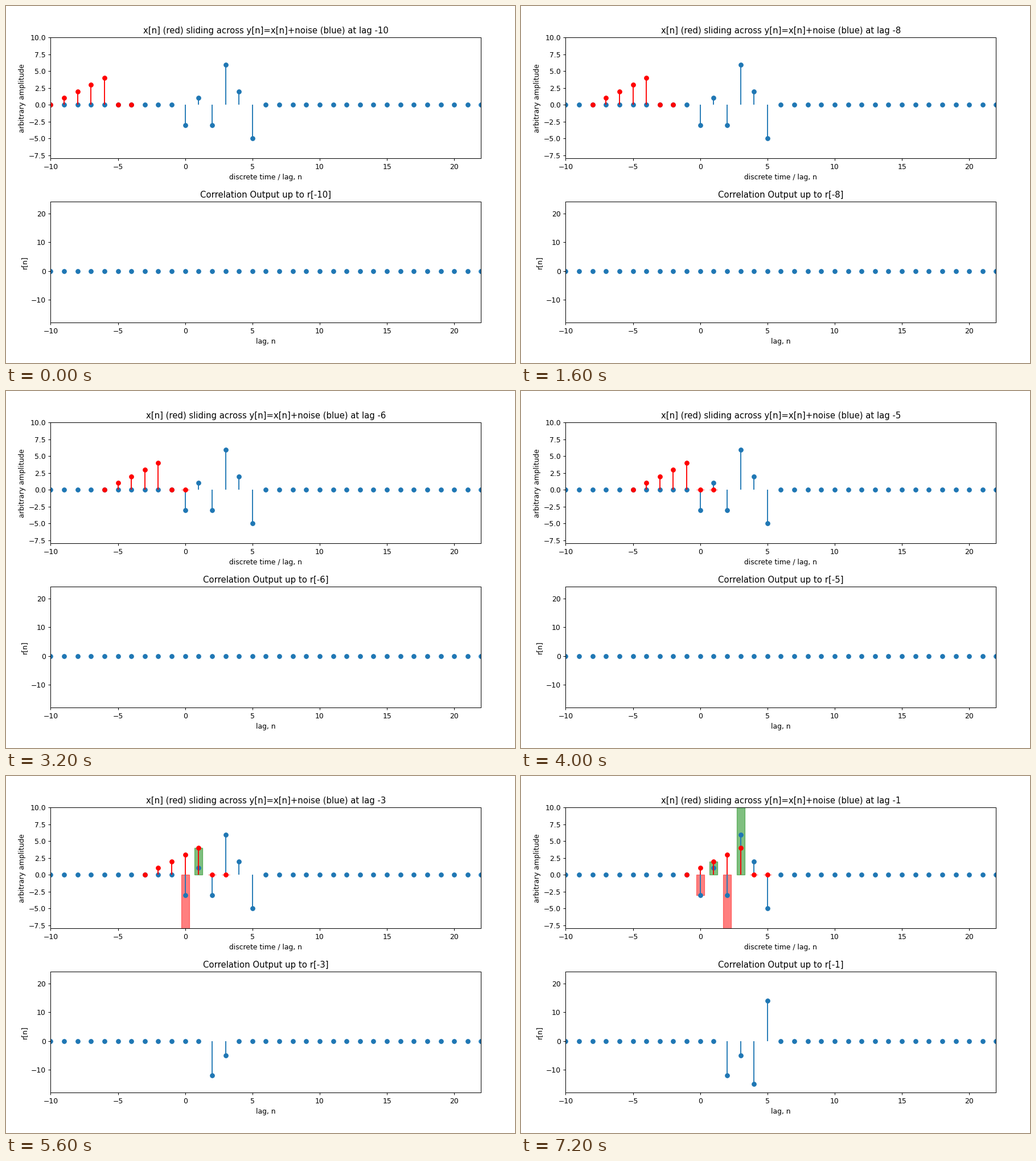
A matplotlib script for the animation above (8 s loop, 894 by 626 pixels).

```python
import matplotlib.pyplot as plt
import numpy as np
from matplotlib.animation import FuncAnimation
from matplotlib.patches import Rectangle

W, H, DPI = 894, 626, 89.4
LEFT, RIGHT = 78.49, 834.45
FIRST_LAG, LAGS = -10, 10

x = np.array([0, 1, 2, 3, 4, 0, 0])
n = np.arange(-10, 23)
pulse = np.array([-3, 1, -3, 6, 2, -5])
y = np.zeros(n.size)
y[10:10 + pulse.size] = pulse

plt.rcParams["font.family"] = "DejaVu Sans"
fig = plt.figure(figsize=((W + 0.001) / DPI, (H + 0.001) / DPI), dpi=DPI)


def make_axes(top, bottom, ylim, yticks, xlabel, ylabel):
    ax = fig.add_axes([LEFT / W, 1 - bottom / H, (RIGHT - LEFT) / W, (bottom - top) / H])
    ax.set(xlim=(-10, 22), ylim=ylim, yticks=yticks,
           xticks=range(-10, 21, 5), xlabel=xlabel, ylabel=ylabel)
    return ax


def make_stem(ax, pos, values, color):
    lines = ax.vlines(pos, 0, values, colors=color, linewidth=1.5, zorder=2)
    dots, = ax.plot(pos, values, "o", color=color, zorder=2)
    return lines, dots


def set_stem(stem, pos, values):
    lines, dots = stem
    lines.set_segments([[(p, 0), (p, v)] for p, v in zip(pos, values)])
    dots.set_data(pos, values)


top_ax = make_axes(55.4, 267.4, (-8, 10), np.arange(-7.5, 10.1, 2.5),
                   "discrete time / lag, n", "arbitrary amplitude")
low_ax = make_axes(343.45, 555.45, (-18, 24), range(-10, 21, 10), "lag, n", "r[n]")

make_stem(top_ax, n, y, "C0")
x_stem = make_stem(top_ax, np.arange(x.size) + FIRST_LAG, x, "red")
r_stem = make_stem(low_ax, n, np.zeros(n.size), "C0")
bars = [top_ax.add_patch(Rectangle((k - 0.3, 0), 0.6, 0, alpha=0.5, zorder=1))
        for k in range(pulse.size)]


def product(k, lag):
    """Overlap product at time k, or None where x does not reach."""
    i = k - lag
    return x[i] * pulse[k] if 0 <= i < x.size else None


def correlate(lag):
    return sum(product(k, lag) or 0 for k in range(pulse.size))


def update(frame):
    lag = FIRST_LAG + frame
    set_stem(x_stem, np.arange(x.size) + lag, x)

    for k, bar in enumerate(bars):
        p = product(k, lag)
        bar.set_visible(p is not None)
        bar.set_height(p or 0)
        bar.set_color("green" if p and p > 0 else "red")

    # each result is plotted where the last sample of x sits
    r = np.zeros(n.size)
    for past in range(FIRST_LAG, lag + 1):
        r[past + x.size - 1 - n[0]] = correlate(past)
    set_stem(r_stem, n, r)

    top_ax.set_title(f"x[n] (red) sliding across y[n]=x[n]+noise (blue) at lag {lag}")
    low_ax.set_title(f"Correlation Output up to r[{lag}]")
    return []


anim = FuncAnimation(fig, update, frames=LAGS, interval=800,
                     repeat=True, repeat_delay=0, blit=False)
plt.show()
```
